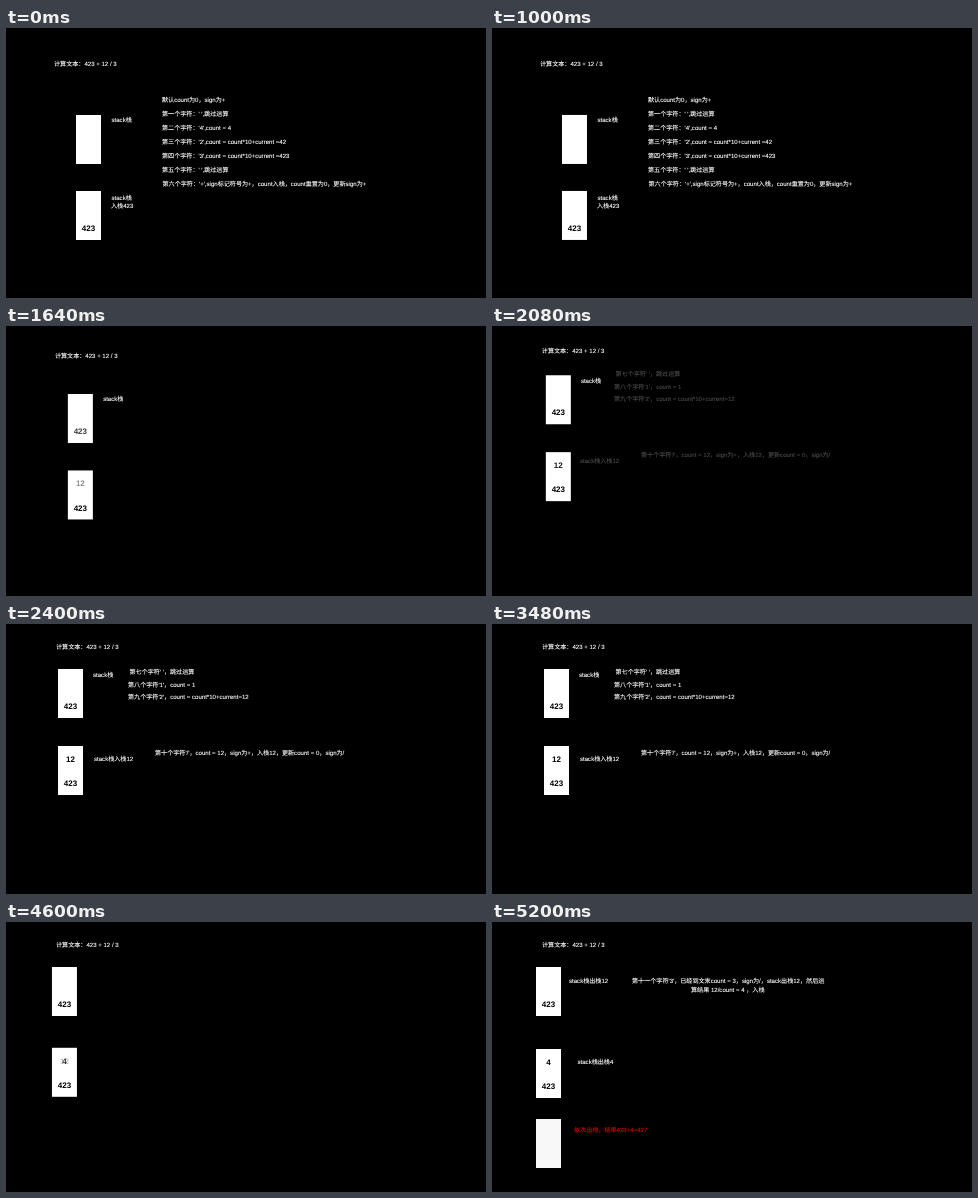
Recreate the animation shown at these times as an HTML page. Size 480x270 px, loop 6280 ms.

```html
<!DOCTYPE html>
<html>
<head>
<meta charset="utf-8">
<style>
html, body { margin: 0; width: 100%; height: 100%; overflow: hidden; background: #000; }
svg { display: block; width: 480px; height: 270px; }
text {
  font: 6.08px "Liberation Sans", "Noto Sans CJK SC", "Noto Sans CJK", sans-serif;
  fill: #fff; stroke: #fff; stroke-width: .12px;
  white-space: pre; text-rendering: geometricPrecision;
}
text.num { font-size: 8px; font-weight: bold; fill: #000; stroke: none; text-anchor: middle; }
text.red { fill: #d00000; stroke: #d00000; }
</style>
</head>
<body>
<svg id="stage" viewBox="0 0 480 270"></svg>
<script>
const LOOP = 6280, STEP = 40, FADE = 440;
// Start and end of the two moves between the three scenes
const MOVES = [[960, 2400], [3440, 5200]];

const stage = document.getElementById("stage");

function add(parent, tag, attrs = {}, content = "") {
  const node = document.createElementNS("http://www.w3.org/2000/svg", tag);
  for (const key in attrs) node.setAttribute(key, attrs[key]);
  node.textContent = content;
  parent.append(node);
  return node;
}

const group = () => add(stage, "g");
// y is the visual middle of the line
const line = (parent, x, y, content, cls = "") =>
  add(parent, "text", { x, y: y + 2.2, class: cls }, content);
const number = (box, y, content) =>
  add(box, "text", { x: 12.5, y: y + 2.9, class: "num" }, content);

function makeBox(parent, x = 0, y = 0) {
  add(parent, "rect", { x, y, width: 25, height: 49, fill: "#fff" });
  return parent;
}

const scenes = [
  [
    [105.5, 170, "stack栈"],
    [105, 178, "入栈423"],
    [156, 72, "默认count为0，sign为+"],
    [156, 86, "第一个字符：' ',跳过运算"],
    [156, 100, "第二个字符：'4',count = 4"],
    [156, 114, "第三个字符：'2',count = count*10+current =42"],
    [156, 128, "第四个字符：'3',count = count*10+current =423"],
    [156, 142, "第五个字符：' ',跳过运算"],
    [156.5, 156, "第六个字符：'+',sign标记符号为+，count入栈，count重置为0，更新sign为+"]
  ],
  [
    [123.5, 47.3, "第七个字符' '，跳过运算"],
    [122, 60.3, "第八个字符'1'，count = 1"],
    [122, 73.2, "第九个字符'2'，count = count*10+current=12"],
    [88, 135, "stack栈入栈12"],
    [149, 129, "第十个字符'/'，count = 12，sign为+，入栈12，更新count = 0，sign为/"]
  ],
  [
    [77, 58.5, "stack栈出栈12"],
    [140, 59.2, "第十一个字符'3'，已经到文末count = 3，sign为/，stack出栈12，然后运"],
    [199, 67.7, "算结果 12/count = 4 ，入栈"],
    [85.5, 139.5, "stack栈出栈4"],
    [82, 208, "依次出栈，结果423+4=427", "red"]
  ]
].map(lines => {
  const g = group();
  lines.forEach(args => line(g, ...args));
  return g;
});
add(scenes[2], "rect", { x: 44, y: 197, width: 25, height: 49, fill: "#f8f8f8" });

const title = group();
line(title, 0, 0, "计算文本：423 + 12 / 3");
const label = group();
line(label, 0, 0, "stack栈");
const upper = makeBox(group());
const upper423 = number(upper, 37, "423");
const lower = makeBox(group());
number(lower, 37.2, "423");
const twelve = number(lower, 13, "12");
const four = number(lower, 13, "4");

// Place of each moving part in the three scenes
const paths = [
  [title, [48, 36], [50, 23], [50, 23]],
  [label, [105.5, 91.5], [87, 51], [87, 51]],
  [upper, [70, 87], [52, 45], [44, 45]],
  [lower, [70, 163], [52, 122], [44, 127]]
];

const clamp = v => Math.min(1, Math.max(0, v));
const mix = (a, b, p) => a + (b - a) * p;

// cubic-bezier(.42, 0, .58, 1)
function easeInOut(x) {
  let lo = 0, hi = 1;
  for (let i = 0; i < 20; i++) {
    const s = (lo + hi) / 2;
    const bx = 1.26 * s * (1 - s) ** 2 + 1.74 * s * s * (1 - s) + s ** 3;
    if (bx < x) lo = s; else hi = s;
  }
  return lo * lo * (3 - 2 * lo);
}

function draw(t) {
  const [p, q] = MOVES.map(([from, to]) => {
    const x = clamp((t - from) / (to - from));
    return x === 0 || x === 1 ? x : easeInOut(x);
  });
  const fadeOut = MOVES.map(([from]) => 1 - clamp((t - from - STEP) / FADE));
  const fadeIn = MOVES.map(([, to]) => clamp((t - to + FADE) / FADE));
  const show = (node, opacity) => node.setAttribute("opacity", opacity);

  for (const [node, a, b, c] of paths) {
    const [x, y] = [0, 1].map(i => mix(mix(a[i], b[i], p), c[i], q));
    node.setAttribute("transform", `translate(${x} ${y})`);
  }
  show(scenes[0], fadeOut[0]);
  show(scenes[1], fadeIn[0] * fadeOut[1]);
  show(scenes[2], fadeIn[1]);
  show(label, fadeOut[1]);
  show(upper423, clamp(p * 1.7));
  show(twelve, p * (1 - q));
  show(four, q);
}

const start = performance.now();
function tick() {
  const t = (performance.now() - start) % LOOP;
  draw(Math.floor(t / STEP) * STEP);
  requestAnimationFrame(tick);
}
tick();
</script>
</body>
</html>
```
